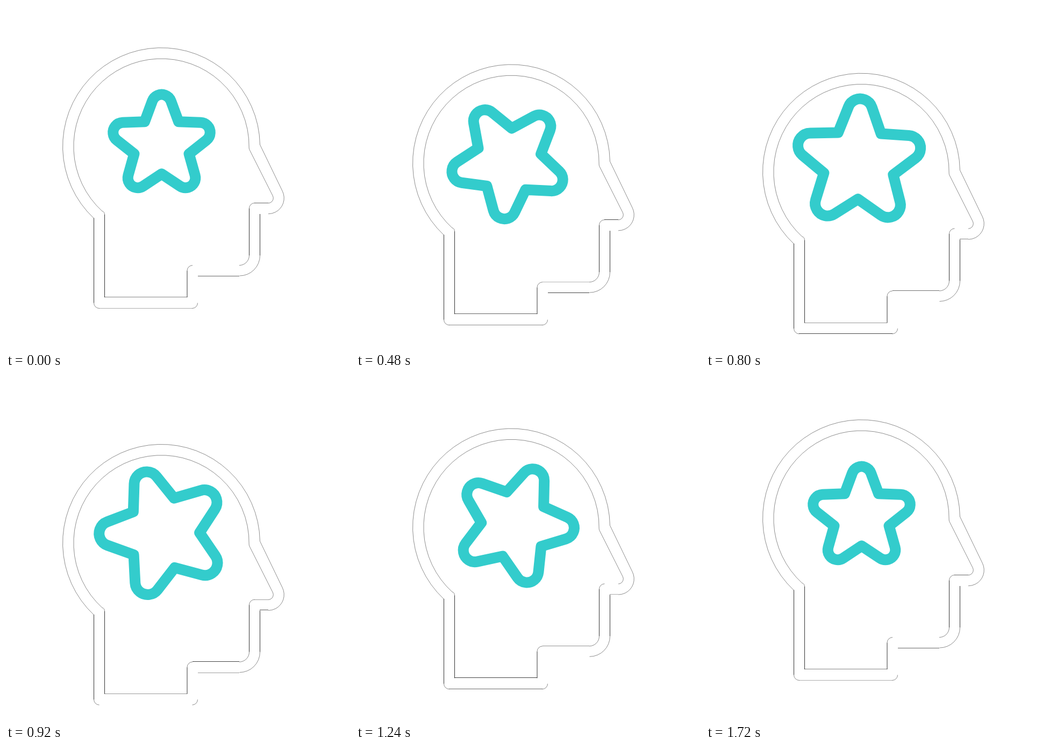
An HTML page with a canvas that plays this animation: 640 px wide and 640 px high, repeating every 1920 ms.

```html
<!DOCTYPE html>
<html lang="en">
<head>
<meta charset="utf-8">
<title>Star mind</title>
<style>
  html, body { margin: 0; width: 100%; height: 100%; overflow: hidden; background: #fff; }
  canvas { display: block; }
</style>
</head>
<body>
<canvas id="stage" width="640" height="640"></canvas>
<script>
const ctx = document.getElementById('stage').getContext('2d');
const LOOP = 1920, STEP = 40, START = 40;
const RAD = Math.PI / 180;

// Symmetric cubic-bezier(k, 0, 1 - k, 1), solved by bisection.
function ease(x, k = 0.51) {
  x = Math.min(1, Math.max(0, x));
  let lo = 0, hi = 1, s = 0.5;
  for (let i = 0; i < 30; i++) {
    s = (lo + hi) / 2;
    const bx = 3 * k * s * (1 - s) ** 2 + 3 * (1 - k) * s * s * (1 - s) + s ** 3;
    if (bx < x) lo = s; else hi = s;
  }
  return s * s * (3 - 2 * s);
}

const span = (t, from, length) => ease((t - from) / length);
const thereAndBack = (t, half) => span(t, START, half) - span(t, START + half, half);

function arc(cx, cy, r, from, to, ccw = false) {
  ctx.arc(cx, cy, r, from * RAD, to * RAD, ccw);
}

// An arc that does not join the line before it.
function looseArc(cx, cy, r, from, to) {
  ctx.moveTo(cx + r * Math.cos(from * RAD), cy + r * Math.sin(from * RAD));
  arc(cx, cy, r, from, to);
}

function drawCurves() {
  ctx.lineWidth = 0.45;
  ctx.beginPath();
  // outer contour
  arc(289, 261.2, 183.5, 133.2, 359);
  arc(488, 357.4, 29.3, -26.6, 90);
  looseArc(434.5, 464, 38, 0, 90);
  looseArc(346.5, 552.5, 10, 0, 90);
  looseArc(173.5, 552.5, 10, 90, 180);
  // inner contour
  ctx.moveTo(183.5, 388);
  ctx.quadraticCurveTo(183.5, 384, 180, 381.5);
  arc(289, 261.2, 163.2, 132.2, 361);
  ctx.quadraticCurveTo(452.2, 266, 453.6, 268.5);
  arc(488, 357.4, 9.3, -26.6, 90);
  looseArc(462.5, 376.5, 10, 180, 270);
  looseArc(434, 464, 18.5, 0, 90);
  looseArc(347, 492.5, 10, 180, 270);
  ctx.stroke();
}

function drawUpright(x, y1, y2) {
  ctx.lineWidth = 0.8;
  ctx.beginPath();
  ctx.moveTo(x, y1);
  ctx.lineTo(x, y2);
  ctx.stroke();
}

// Level hairlines sit on whole pixel rows and fade with their alignment.
function drawLevel(x1, x2, y, minAlpha = 0) {
  const row = Math.floor(y), part = y - row;
  ctx.globalAlpha = Math.max(minAlpha, part < 0.3 ? 0 : part);
  ctx.lineWidth = 0.8;
  ctx.beginPath();
  ctx.moveTo(x1, row + 0.5);
  ctx.lineTo(x2, row + 0.5);
  ctx.stroke();
  ctx.globalAlpha = 1;
}

function drawHead(drop) {
  ctx.strokeStyle = '#000';
  ctx.lineJoin = 'round';
  ctx.save();
  ctx.translate(0, drop);
  drawCurves();
  drawUpright(163.5, 394.5, 552.5);
  drawUpright(183.5, 388, 542);
  drawUpright(337, 492.5, 542);
  drawUpright(452.5, 376.5, 464);
  drawUpright(472.5, 387, 464);
  ctx.restore();
  drawLevel(462, 488, 366.75 + drop);
  drawLevel(472, 488, 386.08 + drop);
  drawLevel(347, 434, 482.2 + drop);
  drawLevel(357, 434, 502.75 + drop);
  drawLevel(183, 337, 541.6 + drop, 0.5);
  drawLevel(173, 347, 562.4 + drop);
}

function drawStar(drop, angle, scale) {
  // The pivot lies above the star's own centre.
  const cx = 289.5 - 7.2 * scale * Math.sin(angle * RAD);
  const cy = 251.4 + drop + 7.2 * scale * Math.cos(angle * RAD);
  const at = (deg, r) => [cx + r * scale * Math.cos(deg * RAD), cy + r * scale * Math.sin(deg * RAD)];
  ctx.beginPath();
  for (let i = 0; i < 5; i++) {
    const dir = angle - 90 + i * 72;
    arc(...at(dir, 75.6), 18.4 * scale, dir - 69.5, dir + 69.5);
    ctx.lineTo(...at(dir + 36, 53.7));
  }
  ctx.closePath();
  ctx.strokeStyle = '#33cccc';
  ctx.lineWidth = 20;
  ctx.lineJoin = 'round';
  ctx.stroke();
}

function draw(ms) {
  const t = Math.floor((ms % LOOP) / STEP) * STEP;
  const drop = 47.5 * thereAndBack(t, 760);
  ctx.fillStyle = '#fff';
  ctx.fillRect(0, 0, 640, 640);
  drawHead(drop);
  drawStar(drop, 360 * span(t, START, 1680), 1 + 0.267 * thereAndBack(t, 840));
}

let begin;
function tick(now) {
  begin ??= now;
  draw(now - begin);
  requestAnimationFrame(tick);
}
draw(0);
requestAnimationFrame(tick);
</script>
</body>
</html>
```
